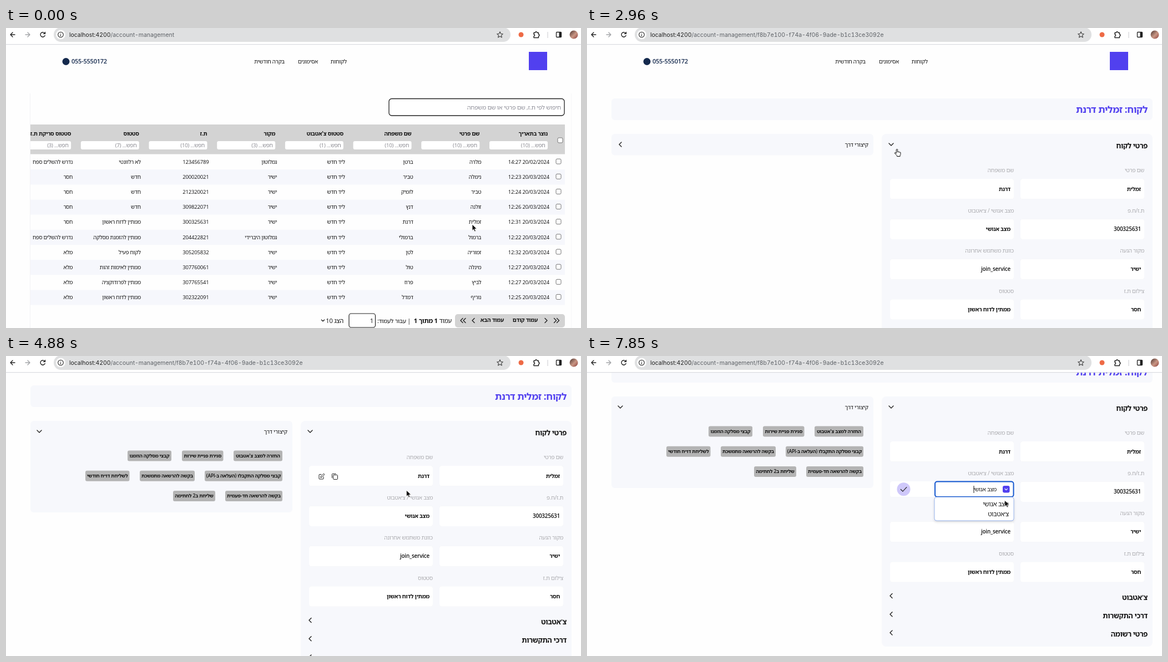
Recreate the animation shown at these times as an HTML page. Size 1036 px wide and 541 px high, loop 7.99 s.

```html
<!DOCTYPE html>
<html lang="he">
<head>
<meta charset="utf-8">
<title>Account management</title>
<style>
html, body { margin: 0; width: 100%; height: 100%; overflow: hidden; background: #fefefe; }
svg { display: block; width: 1036px; height: 541px; }
text { font-family: 'Open Sans', 'Noto Sans Hebrew', 'Noto Sans', 'DejaVu Sans', sans-serif; letter-spacing: -.02em; white-space: pre; }
.rtl { direction: rtl; }
.url { font: 10.45px Inter, Roboto, sans-serif; font-variant-numeric: tabular-nums; letter-spacing: 0; fill: #5f6368; }
.line { fill: none; stroke: #222; stroke-width: 1.4; stroke-linecap: round; stroke-linejoin: round; }
.field { filter: drop-shadow(0 .5px .6px #00000014); }
</style>
</head>
<body>
<svg id="stage" viewBox="0 0 1036 541" xmlns="http://www.w3.org/2000/svg"></svg>
<script>
const LOOP = 7990, INK = '#111', PANEL = '#f7f8fc', GREY = '#d3d3d3', VIOLET = '#5140ef';

// ---------- drawing helpers ----------
const rect = (x, y, w, h, r, fill, more = '') =>
  `<rect x="${x}" y="${y}" width="${w}" height="${h}" rx="${r}" fill="${fill}" ${more}/>`;
const path = (d, more = '') => `<path class="line" d="${d}" ${more}/>`;
const group = (id, body) => `<g id="${id}">${body}</g>`;
// x is the right edge, or the middle when anchor says so; y is the middle of the letters
const text = (x, y, str, size, { fill = INK, weight = 400, anchor = 'start' } = {}) =>
  `<text class="rtl" x="${x}" y="${(y + size * .33).toFixed(1)}" font-size="${size}" font-weight="${weight}" fill="${fill}" text-anchor="${anchor}">${str}</text>`;
const chevron = (x, y, dir, s = 4) => path({
  left: `M${x + s / 2} ${y - s}l${-s} ${s}l${s} ${s}`,
  right: `M${x - s / 2} ${y - s}l${s} ${s}l${-s} ${s}`,
  down: `M${x - s} ${y - s / 2}l${s} ${s}l${s} ${-s}`
}[dir]);

// ---------- browser bar ----------
const toolbar = () =>
  rect(0, 0, 1036, 29, 0, '#fff') + rect(0, 29, 1036, 1.2, 0, '#dadce0') +
  rect(86, -1, 823, 26, 13, '#dfe0e1') +
  path('M16 12H8M12 8L8 12L12 16') +
  path('M35 12H43M39 8L43 12L39 16', 'style="stroke:#a3a5a8"') +
  path('M70 10A4.2 4.2 0 1 0 70.2 13.5M70.5 7.5V10.4H67.4') +
  '<circle cx="98.5" cy="12" r="8.5" fill="#fff"/>' +
  '<circle class="line" cx="98.5" cy="12" r="4.8" style="stroke-width:1.1"/>' +
  path('M98.5 11.7V14.3M98.5 9.7V9.8', 'style="stroke-width:1.1"') +
  '<text class="url" x="114" y="15.8"><tspan fill="#1f1f1f">localhost:4200</tspan>/account-management<tspan id="clientId">/f8b7e100-f74a-4f06-9ade-b1c13ce3092e</tspan></text>' +
  path('M890 6.8l1.6 3.5 3.8.4-2.9 2.5.9 3.8-3.4-2-3.4 2 .9-3.8-2.9-2.5 3.8-.4Z', 'style="stroke:#444;stroke-width:1.1"') +
  '<circle cx="928" cy="12" r="4.5" fill="#ee6a45"/>' +
  path('M951 8.5h2.5a1.7 1.7 0 0 1 3.4 0h2.6v3a1.6 1.6 0 0 1 0 3.2v2.8h-8.5v-2.8a1.6 1.6 0 0 0 0-3.2Z') +
  rect(975.5, 7, 1, 11, 0, '#c9cbd0') +
  rect(991.5, 7.5, 9, 9, 1, '#fff', 'stroke="#222" stroke-width="1.3"') + rect(996.5, 7.5, 4, 9, 0, '#222') +
  '<circle cx="1023" cy="12" r="7.5" fill="url(#portrait)"/>';

// ---------- site header ----------
const siteHeader = () =>
  rect(942, 43, 33, 33, 0, VIOLET) +
  text(614, 60.7, 'לקוחות', 9.8) + text(562, 60.7, 'אסימונים', 9.8) + text(502, 60.7, 'בקרה חודשית', 9.8) +
  '<circle cx="108" cy="60.5" r="6.5" fill="#14294d"/>' +
  '<text x="118" y="64.2" font-size="11" font-weight="600" fill="#14294d">055-5550172</text>';

// ---------- list page ----------
const columns = [['נוצר בתאריך', 10], ['שם פרטי', 10], ['שם משפחה', 10], ["סטטוס צ'אטבוט", 1],
  ['מקור', 3], ['ת.ז', 10], ['סטטוס', 7], ['סטטוס סריקת ת.ז', 3]];
const APPENDIX = 'נדרש להשלים ספח', REPORT = 'ממתין לדוח ראשון', DIRECT = 'ישיר', PARTNER = 'גמלוטון';
const clients = [
  ['20/02/2024 14:27', 'מלרה', 'ברטן', PARTNER, '123456789', 'לא רלוונטי', APPENDIX],
  ['20/03/2024 12:23', 'נימלה', 'טביר', DIRECT, '200020021', 'חדש', 'חסר'],
  ['20/03/2024 12:24', 'טביר', 'לומיק', DIRECT, '212320021', 'חדש', 'חסר'],
  ['20/03/2024 12:26', 'זולנה', 'דנץ', DIRECT, '309822071', 'חדש', 'חסר'],
  ['20/03/2024 12:31', 'זמלית', 'דרנת', DIRECT, '300325631', REPORT, 'חסר'],
  ['20/03/2024 12:22', 'ברמול', 'ברמולי', PARTNER + ' היברידי', '204422821', 'ממתין להזמנת מסלקה', APPENDIX],
  ['20/03/2024 12:32', 'זמוריה', 'לטן', DIRECT, '305205832', 'לקוח פעיל', 'מלא'],
  ['20/03/2024 12:27', 'מינלה', 'טול', DIRECT, '307760061', 'ממתין לאימות זהות', 'מלא'],
  ['20/03/2024 12:27', 'לביץ', 'פרוז', DIRECT, '307765541', 'ממתין לפרודוקציה', 'מלא'],
  ['20/03/2024 12:25', 'נוריף', 'דמדל', DIRECT, '302322091', REPORT, 'מלא']];
const checkbox = (x, y) => rect(x - 4.5, y - 4.5, 9, 9, 2, '#fff', 'stroke="#767676"');
const columnRight = i => 976 - i * 122.7;

const tableHead = () => rect(44, 174, 963, 53.5, 0, GREY) + checkbox(998.5, 202.5) +
  columns.map(([name, count], i) => {
    const x = columnRight(i);
    return text(x, 190.5, name, 9.8, { weight: 700 }) + rect(x - 105, 204, 105, 15, 3, '#fff') +
      text(x - 4.5, 211.5, `חפש... (${count})`, 9.6, { fill: '#85858c' });
  }).join('');

const tableRow = (client, i) => {
  const y = 241.6 + i * 27.15, top = y - 13.6;
  const cells = [...client.slice(0, 3), 'ליד חדש', ...client.slice(3)];
  return (i % 2 ? rect(44, top, 963, 27.15, 0, '#f6f7fc') : '') +
    (i === 4 ? rect(44, top, 963, 27.15, 0, '#e9eaf0', 'id="hover"') : '') +
    checkbox(995.5, y - 1) +
    cells.map((cell, c) => text(columnRight(c) + 3, y, cell, 9.5)).join('');
};

const pager = () => rect(809, 516, 198, 24, 5, GREY) +
  text(958, 527, 'עמוד קודם', 9.9, { weight: 600 }) + text(897, 527, 'עמוד הבא', 9.9, { weight: 600 }) +
  chevron(821, 527.5, 'left') + chevron(826, 527.5, 'left') + chevron(842, 527.5, 'left') +
  chevron(973, 527.5, 'right') + chevron(989.5, 527.5, 'right') + chevron(994.5, 527.5, 'right') +
  text(803, 528, 'עמוד <tspan font-weight="700">1 מתוך 1</tspan>', 11.2) +
  text(729, 528, '| עבור לעמוד:', 10.6) +
  rect(618, 515, 47.5, 25, 4, '#fff', 'stroke="#222" stroke-width="1.2"') + text(662, 528, '1', 11.2) +
  text(608, 528, 'הצג 10', 11.2) + chevron(571, 527.5, 'down', 2.6);

const listPage = () =>
  rect(43, 118, 1, 423, 0, '#f3f3f5') + rect(1018, 118, 1, 423, 0, '#f7f7f9') +
  rect(690, 127.5, 316, 30.5, 5, '#fff', 'stroke="#222" stroke-width="1.3"') +
  text(1000, 143, 'חיפוש לפי ת.ז, שם פרטי או שם משפחה', 10.8, { fill: '#8e8e98' }) +
  `<g clip-path="url(#tableArea)">${tableHead()}${clients.map(tableRow).join('')}</g>` + pager();

// ---------- client page ----------
const sectionTitle = (y, name) => text(1010, y, name, 12.7, { weight: 600 });
const sections = (y, names) => names.map((name, i) =>
  sectionTitle(y + i * 33.2, name) + chevron(548, y - 3 + i * 33.2, 'left')).join('');
const later = ["צ'אטבוט", 'דרכי התקשרות', 'פרטי רשומה'];

const fieldBox = (x, y, h = 36.5) => rect(x, y, 223, h, 4, '#fff', 'class="field"');
const fieldValue = (right, y, value) => text(right - 6, y, value, 9.9, { weight: 600 });
const details = [['שם פרטי', 'זמלית', 'שם משפחה', 'דרנת'], ['ת.ז/ח.פ', '300325631', 'מצב אנושי / צ׳אטבוט', 'מצב אנושי'],
  ['מקור הגעה', DIRECT, 'כוונת משתמש אחרונה', 'join_service'], ['צילום ת.ז', 'חסר', 'סטטוס', REPORT]];
const fieldRow = ([labelA, valueA, labelB, valueB], i) => {
  const y = 290.3 + i * 72.4, label = { fill: '#a9a9ad' };
  const second = fieldBox(546, y - 18.3) + fieldValue(769, y, valueB);
  return text(1004, y - 33.3, labelA, 9.9, label) + text(769, y - 33.3, labelB, 9.9, label) +
    fieldBox(781, y - 18.3) + fieldValue(1004, y, valueA) + (i === 1 ? group('modeView', second) : second);
};

const shortcuts = [
  [254, [410, 88, "החזרה למצב צ'אטבוט"], [317, 74.5, 'סגירת פניית שירות'], [219, 79, 'קבצי מסלקה הוזמנו']],
  [290.3, [358, 140, 'קבצי מסלקה התקבלו (העלאה ב-API)'], [241, 99, 'בקשה להרשאה מתמשכת'], [143, 79.5, 'לשליחת דו״ח חודשי']],
  [326.5, [395, 103, 'בקשה להרשאה חד-פעמית'], [301, 76, 'שליחת ב2 לחתימה']]];
const shortcutRow = ([y, ...buttons]) => buttons.map(([x, w, label]) =>
  rect(x, y - 9.5, w, 19, 3, '#b4b4b4') + text(x + w / 2, y, label, 8.6, { weight: 600, anchor: 'middle' })).join('');

const tools = y => `<g transform="translate(0 ${y})">` +
  path('M568-3.5h-3a1 1 0 0 0-1 1v6.5a1 1 0 0 0 1 1h6a1 1 0 0 0 1-1v-3M567 2l.4-2 5-5 1.6 1.6-5 5Z', 'style="stroke-width:1"') +
  rect(589.5, -2.5, 8, 8, 1.2, 'none', 'class="line" style="stroke-width:1"') +
  path('M587.4 2.5V-3.6a1 1 0 0 1 1-1h6', 'style="stroke-width:1"') + '</g>';

const modeEditor = () => fieldBox(546, 344, 28.5) +
  '<circle cx="570.5" cy="358.3" r="12" fill="#cfc8fa"/>' + path('M565.3 358.5l3.6 3.7 7-7.6', 'style="stroke-width:1.2"') +
  rect(626.5, 344, 142, 28, 4, '#fff', 'stroke="#a9c0ee"') +
  group('focus', rect(627, 344.5, 141.5, 27.5, 4, '#fff', 'stroke="#1558cf" stroke-width="2"') + rect(696.5, 352, 1, 13, 0, INK)) +
  rect(749, 352, 12.5, 12.5, 3, VIOLET) + path('M752.9 357.3l2.3 2.3 2.3-2.3', 'style="stroke:#fff;stroke-width:1.2"') +
  text(738, 358.3, 'מצב אנושי', 10) +
  group('options', rect(626, 372.5, 143, 42.5, 4, '#fff', 'stroke="#9ab6ee" style="filter:drop-shadow(0 2px 2px #0002)"') +
    text(760, 385, 'מצב אנושי', 11.2) + text(760, 403, 'צ׳אטבוט', 11.2));

const clientPage = () => rect(44, 127, 975, 39, 6, PANEL) +
  text(1010, 147, 'לקוח: זמלית דרנת', 17, { fill: VIOLET, weight: 700 }) +
  group('detailsShut', rect(531, 191, 488, 144, 8, PANEL) + chevron(548, 210, 'left') + sections(246.3, later)) +
  group('detailsOpen', rect(531, 191, 488, 451, 8, PANEL) + chevron(548, 210, 'down') +
    details.map(fieldRow).join('') + sections(553.5, later)) +
  sectionTitle(213.2, 'פרטי לקוח') +
  group('shortcutsShut', rect(44, 191, 472, 38.5, 6, PANEL) + chevron(60, 210, 'left')) +
  group('shortcutsOpen', rect(44, 191, 472, 165, 6, PANEL) + chevron(60, 210, 'down') + shortcuts.map(shortcutRow).join('')) +
  text(507, 210.5, 'קיצורי דרך', 10.1) +
  group('nameTools', tools(291)) +
  group('editHover', '<circle cx="568" cy="363" r="10" fill="#acacac"/>') +
  group('modeTools', tools(363)) + group('modeEdit', modeEditor());

// ---------- pointer, hot spot at 0,0 ----------
const pointer = () =>
  group('arrow', '<path d="M0 0V11.4L2.6 9L4.4 13.2L6.4 12.3L4.6 8.2H8.2Z" fill="#000" stroke="#fff" stroke-width=".9"/>') +
  group('hand', '<path transform="translate(-4.7 0)" d="M3.6 8V1.6a1.1 1.1 0 0 1 2.2 0V5.5q1-.8 1.9.2 1-.7 1.8.3 1.4-.5 1.6 1V9.5q0 1.6-1 2.6V13.6H4.8V12.3Q2.6 10 .8 8q-.5-1.3.7-1.4 1 .2 2.1 1.6Z" fill="#fff" stroke="#000" stroke-width="1"/>');

document.getElementById('stage').innerHTML = `<defs>
  <clipPath id="pageArea"><rect y="30" width="1036" height="511"/></clipPath>
  <clipPath id="tableArea"><rect x="44" y="170" width="963" height="340"/></clipPath>
  <linearGradient id="portrait" x2="1" y2="1"><stop stop-color="#4a3430"/><stop offset=".55" stop-color="#c99684"/><stop offset="1" stop-color="#8d3f3c"/></linearGradient>
</defs>
<g clip-path="url(#pageArea)">${group('scroll', siteHeader() + group('list', listPage()) + group('client', clientPage()))}</g>
${toolbar()}${group('pointer', pointer())}`;

// ---------- timeline ----------
const sheet = document.head.appendChild(document.createElement('style'));
const steps = (id, keys) => {
  const frames = [...keys, [LOOP, keys[keys.length - 1][1]]].map(([ms, css]) => `${(ms / LOOP * 100).toFixed(3)}%{${css}}`);
  sheet.append(`@keyframes ${id}{${frames.join('')}}#${id}{animation:${id} ${LOOP}ms step-end infinite}\n`);
};
const show = (id, ...spans) => {
  const keys = [[0, 'opacity:0']];
  for (const [from, to = LOOP] of spans) {
    if (!from) keys.pop();
    keys.push([from, 'opacity:1']);
    if (to < LOOP) keys.push([to, 'opacity:0']);
  }
  steps(id, keys);
};

steps('hover', [[0, 'opacity:0'], [300, 'opacity:.6'], [440, 'opacity:1']]);
show('list', [0, 1040]);
show('client', [1040]);
show('clientId', [1040]);
steps('clientId', [[0, 'fill-opacity:0'], [1040, 'fill-opacity:1']]);
show('detailsShut', [0, 2520]);
show('detailsOpen', [2520]);
show('shortcutsShut', [0, 3700]);
show('shortcutsOpen', [3700]);
show('nameTools', [4290, 5620]);
show('modeTools', [5620, 6800]);
show('editHover', [6060, 6800]);
show('modeView', [0, 6800]);
show('modeEdit', [6800]);
show('focus', [7700]);
show('options', [7700]);
steps('scroll', [[0, 0], [4590, 1], [4740, 28], [4880, 74], [5030, 103], [5180, 115], [5330, 117], [5470, 118]]
  .map(([ms, y]) => [ms, `transform:translateY(${-y}px)`]));
steps('pointer', [[0, 840, 354], [300, 840, 355], [1180, 840, 350], [1630, 840, 341], [1780, 839, 295], [1920, 837, 248],
  [2070, 836, 220], [2220, 836, 207], [2960, 558.5, 218], [3110, 472, 191], [3250, 428, 203], [3400, 416, 208],
  [4000, 540, 222], [4140, 676, 238], [4290, 721.5, 242], [5470, 700, 243], [5620, 634, 244], [5770, 600, 246],
  [5920, 577, 247], [6060, 571, 247], [6360, 568, 247], [6510, 566.5, 246], [6950, 600, 244], [7100, 670, 243],
  [7250, 725, 242], [7400, 752, 242], [7850, 752.5, 260]]
  .map(([ms, x, y]) => [ms, `transform:translate(${x}px,${y}px)`]));
show('arrow', [0, 300], [1180, 2070], [3110, 3250], [4000, 6060], [6950]);
show('hand', [300, 1180], [2070, 3110], [3250, 4000], [6060, 6950]);
</script>
</body>
</html>
```
